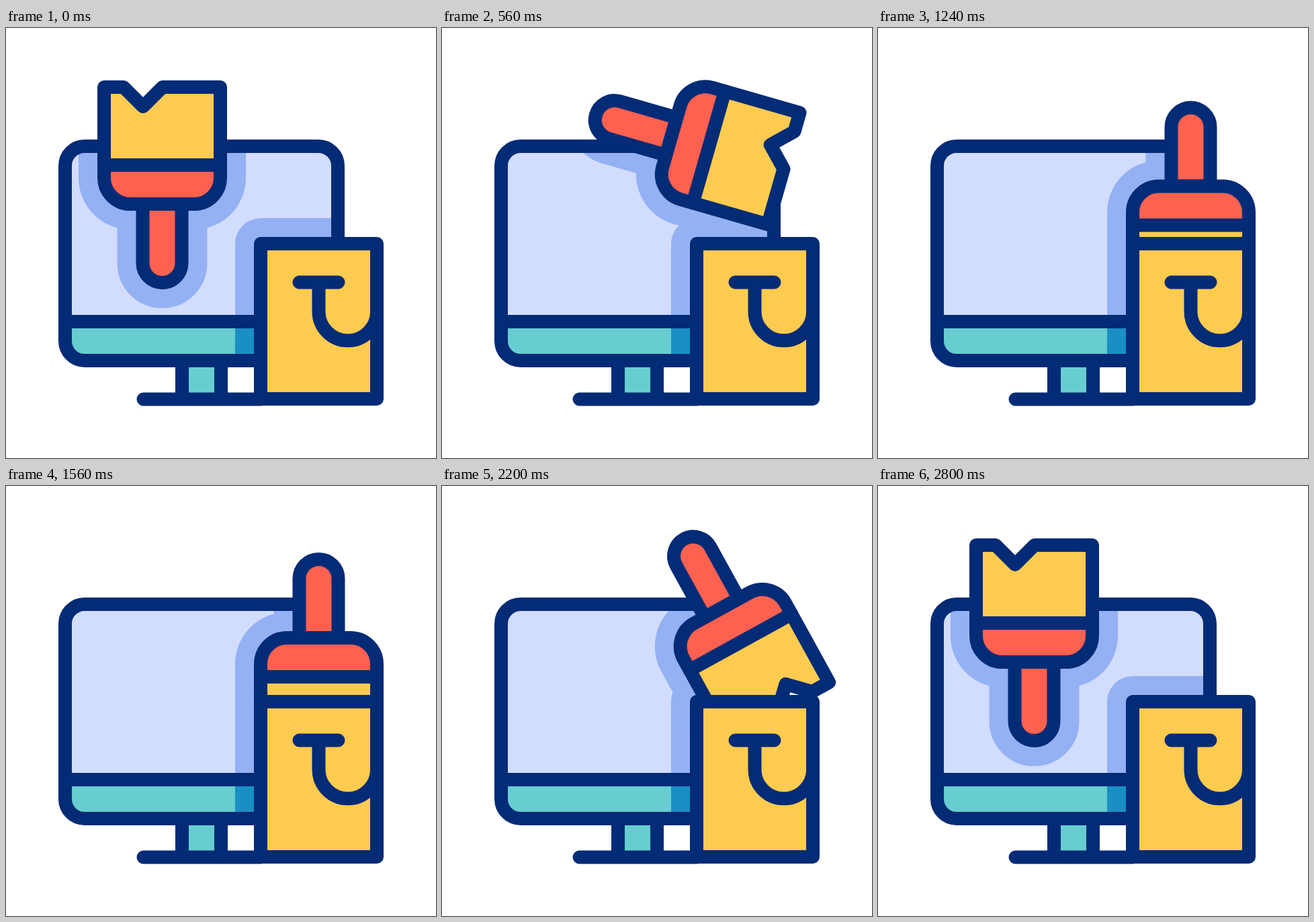
An HTML page that plays this animation: 640x640 px, repeating every 3000 ms.

```html
<!DOCTYPE html>
<html lang="en">
<head>
<meta charset="utf-8">
<title>Paintbrush and bag</title>
<style>
  html, body { margin: 0; width: 100%; height: 100%; overflow: hidden; background: #fff; }
  svg { display: block; width: 100vw; height: 100vh; }
  .line { fill: none; stroke: #042b76; stroke-width: 20; stroke-linecap: round; stroke-linejoin: round; }
  .shade { fill: #94b1f3; stroke: #94b1f3; stroke-width: 76; stroke-linejoin: round; }
</style>
</head>
<body>
<svg viewBox="0 0 640 640">
  <defs>
    <clipPath id="screen"><path d="M88 437V205a29 29 0 0 1 29-29H465a29 29 0 0 1 29 29V437Z"/></clipPath>
    <path id="head" d="M146 88H175L204 117L233 88H319V223a39 39 0 0 1-39 39H185a39 39 0 0 1-39-39Z"/>
    <path id="grip" d="M203.5 262V350a29 29 0 0 0 58 0V262Z"/>
    <path id="bag" d="M379 321H552V552H379Z"/>
  </defs>

  <path d="M262 495H320V552H262Z" fill="#67cdd1"/>
  <path class="line" d="M262 495V552M320 495V552M204.5 552.5H379"/>

  <rect x="88" y="176" width="406" height="319" rx="29" fill="#67cdd1"/>
  <path d="M341 437H400V495H341Z" fill="#1a8fc5"/>
  <g clip-path="url(#screen)">
    <path d="M88 176H494V437H88Z" fill="#d2dcfd"/>
    <use href="#bag" class="shade"/>
    <g class="brush shade"><use href="#head"/><use href="#grip"/></g>
  </g>
  <rect class="line" x="88" y="176" width="406" height="319" rx="29"/>
  <path class="line" d="M88 437H494"/>

  <g class="brush">
    <use href="#grip" fill="#ff6150"/>
    <use href="#grip" class="line"/>
    <use href="#head" fill="#fdcb50"/>
    <path d="M146 204H319V223a39 39 0 0 1-39 39H185a39 39 0 0 1-39-39Z" fill="#ff6150"/>
    <use href="#head" class="line"/>
    <path class="line" d="M146 204H319"/>
  </g>

  <use href="#bag" fill="#fdcb50"/>
  <use href="#bag" class="line"/>
  <path class="line" d="M436.5 378.5H494.5M465.5 378.5V422a43.3 43.3 0 0 0 86.6 0"/>
</svg>
<script>
const LOOP = 3000, SWING = 903, OUT = 81, BACK = 2795;
const brushes = document.querySelectorAll('.brush');

// The brush centre along its swing, by share of the half turn
const turns = [0, 0.118, 0.333, 0.938, 1];
const pathX = [232.5, 247.6, 298.5, 452, 465.5];
const pathY = [233, 202, 165.5, 219.8, 224];

const clamp = v => Math.min(1, Math.max(0, v));
const smooth = v => v * v * (3 - 2 * v);
const cubicInOut = v => v < 0.5 ? 4 * v ** 3 : 1 - 4 * (1 - v) ** 3;

// Polynomial curve through the given values
const through = (values, p) => values.reduce((sum, value, i) =>
  sum + turns.reduce((w, q, j) => j === i ? w : w * (p - q) / (turns[i] - q), value), 0);

function pose(t) {
  const u = clamp(Math.min(t - OUT, BACK - t) / SWING);
  const p = cubicInOut(u);
  const settle = 35 * smooth(clamp((u - 0.74) / 0.26));
  const w = 2 * Math.PI * clamp((t - OUT - SWING) / (BACK - OUT - 2 * SWING));
  const dip = 7.7 * (Math.cos(w) - Math.cos(2 * w));
  return { x: through(pathX, p), y: through(pathY, p) + settle + dip, angle: 180 * p };
}

function draw() {
  const { x, y, angle } = pose(performance.now() % LOOP);
  for (const brush of brushes)
    brush.setAttribute('transform', `translate(${x} ${y}) rotate(${angle}) translate(-232.5 -233)`);
  requestAnimationFrame(draw);
}
draw();
</script>
</body>
</html>
```
